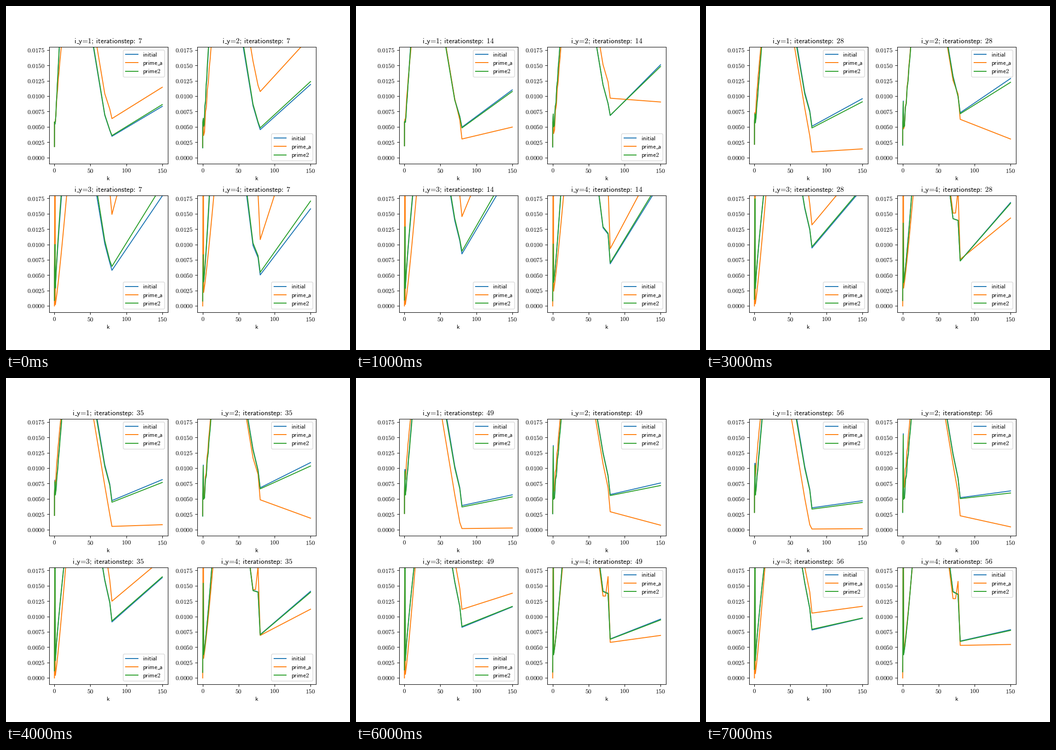
Write a matplotlib script that moves like this. It is 748x748 px and loops after 8 s.

```python
import matplotlib.pyplot as plt
import numpy as np
from matplotlib.animation import FuncAnimation
from matplotlib.lines import Line2D
from matplotlib.patches import FancyBboxPatch

plt.rcParams["mathtext.fontset"] = "cm"

SIZE, DPI = 748, 96
STEPS = 8
LAST = STEPS - 1
TOP = 18                           # upper y limit, in thousandths
COLORS = ["tab:blue", "tab:orange", "tab:green"]

BAR = r"_{\hspace{0.06}\overline{\hspace{0.4}}}"   # short baseline rule
NAMES = ["initial", "prime" + BAR + "a", "prime2"]

fig = plt.figure(figsize=(SIZE / DPI, SIZE / DPI), dpi=DPI, facecolor="white")
grid = fig.subplots(2, 2, gridspec_kw=dict(
    left=93.6 / SIZE, right=673.9 / SIZE, bottom=82.4 / SIZE, top=658.9 / SIZE,
    wspace=0.25, hspace=0.27))
panels = []


def basis(t):
    return np.array([1, np.exp(-t), t])


FIT = np.linalg.inv([basis(t) for t in (0, 2, LAST)])


def value(keys, t):
    """Constant, exponential (first, last) or a quick transient followed by
    exponential drift (first, at step 2, last)."""
    keys = np.atleast_1d(keys)
    if len(keys) == 1:
        return keys[0]
    if len(keys) == 2:
        return keys[0] * (keys[1] / keys[0]) ** (t / LAST)
    return np.exp(basis(t) @ FIT @ np.log(keys))


def curve(t, vertex, end, lift, knee, slope, start, bump, spike, dip, reach,
          power, wobble):
    """Spike and jagged rise near k=0, then a flank falling to a vertex at k=80."""
    vertex, end, lift, knee, start, spike, dip, reach = (
        value(v, t) for v in (vertex, end, lift, knee, start, spike, dip, reach))
    u = np.linspace(0, 1, 9)
    zigzag = wobble * (1 - u) * (-1) ** np.arange(9)
    shoulder = vertex + lift
    k = np.concatenate([[0, 0.1, 0.8], 1.3 + u * (reach - 1.3),
                        [2 * reach, 35, 70, 73.5, 77, 80, 150]])
    y = np.concatenate([[start, bump, spike], dip + (TOP - dip) * u ** power + zigzag,
                        [2 * TOP, shoulder + 35 * slope, shoulder,
                         vertex + lift * min(1, (1 + knee) / 2),
                         vertex + lift * knee, vertex, end]])
    return k, y


def sans(text):
    return r"$\mathsf{" + text + "}$"


def title(number, step):
    return sans("i" + BAR + r"y\text{=}%d\text{;}\hspace{0.45}"
                r"iterationstep\text{:}\hspace{0.45}%d" % (number, step))


def label(x, y, text, align):
    """Text at a pixel position measured from the bottom left."""
    return fig.text(x / SIZE, y / SIZE, text, fontsize=10, ha=align, va="baseline")


def style_axes(ax):
    ax.set_xlim(-7.5, 157.5)
    ax.set_ylim(-1, TOP)
    xs, ys = np.arange(0, 151, 50), np.arange(8) * 2.5
    ax.set_xticks(xs, [r"$\mathrm{%d}$" % v for v in xs])
    ax.set_yticks(ys, [r"$\mathrm{%.4f}$" % (v / 1000) for v in ys])


def make_legend(right, top):
    w, h = 90, 58.8
    left = right - w
    box = FancyBboxPatch((left, top - h), w, h, transform=None,
                         boxstyle="round,pad=0,rounding_size=2.7",
                         fc="white", ec="0.8", lw=1, alpha=0.8)
    parts = [fig.add_artist(box)]
    for n, (name, color) in enumerate(zip(NAMES, COLORS)):
        y = top - 9.3 - 18.3 * n
        line = Line2D([left + 5.3, left + 32], [y, y], transform=None,
                      color=color, lw=1.5)
        parts += [fig.add_artist(line), label(left + 42.2, y - 4.7, sans(name), "left")]
    return parts


def add_panel(raised_from, initial, prime, lag, bump, kink=1, wobble=0):
    number = len(panels) + 1
    ax = grid.flat[number - 1]
    style_axes(ax)
    box = ax.get_position().extents * SIZE
    label((box[0] + box[2]) / 2, box[1] - 36.2, sans("k"), "center")
    lines = [ax.plot([], [], color=c, lw=1.5)[0] for c in COLORS]
    upper = make_legend(box[2] - 6.6, box[3] - 6.7)
    lower = make_legend(box[2] - 6.6, box[1] + 65.4)

    common = dict(bump=bump, slope=0.5 + 0.2 * kink, wobble=wobble)
    initial = dict(lift=np.array([4.1, 5.8, 7.4]) + 0.45 * (number - 2.5),
                   knee=np.array([0.28, 0.44, 0.45]) * kink, **initial, **common)
    prime = dict(prime, **common)

    def update(t):
        k, y = curve(t, **initial)
        drift = value((1.035, 0.955, 0.94), t)
        at_vertex, at_end = drift + lag[0], drift + lag[1]
        gain = np.where(k < 80, np.sqrt(at_vertex), np.where(k < 150, at_vertex, at_end))
        gain[:2] = 1
        lines[0].set_data(k, y)
        lines[1].set_data(*curve(t, **prime))
        lines[2].set_data(k, y * gain)
        ax.set_title(title(number, 7 * (t + 1)), fontsize=11.75)
        for part in upper:
            part.set_visible(t >= raised_from)
        for part in lower:
            part.set_visible(t < raised_from)

    panels.append(update)


def reach(offset):
    return np.array([6.8, 9.3, 10.4]) + offset


def shrink(first):
    return first, 0.86 * first


add_panel(
    0, lag=(0, 0), bump=5.8, wobble=0.3,
    initial=dict(vertex=(3.47, 5.3, 3.55), end=(8.34, 10.85, 4.7),
                 start=(1.8, 2.8), spike=(5.45, 10.8), dip=5.5,
                 reach=reach(0), power=1),
    prime=dict(vertex=(6.35, 1.63, 0.1), end=(11.45, 2.57, 0.15),
               lift=(4.05, 7.3, 5), knee=(0.38, 0.44, 0.14),
               start=(1.8, 2.8), spike=(5.8, 10), dip=(5.5, 8.3),
               reach=shrink(9.5), power=0.8))

add_panel(
    3, lag=(0.03, 0.005), bump=5.8, wobble=0.8,
    initial=dict(vertex=(4.55, 7.5, 5.2), end=(11.9, 14.65, 6.3),
                 start=(1.6, 2.8), spike=(6.2, 15.6), dip=4.2,
                 reach=reach(1.4), power=1),
    prime=dict(vertex=(10.75, 7.9, 2.25), end=(19.7, 5.05, 0.45),
               lift=(4.95, 5.9, 8.35), knee=(0.2, 0.63, 0.45),
               start=(1.8, 3), spike=(5.8, 9), dip=(2.8, 6),
               reach=shrink(11.7), power=0.95))

add_panel(
    7, lag=(0.075, 0.065), bump=5.8,
    initial=dict(vertex=(5.8, 9.4, 7.8), end=(17.9, 21.6, 9.7),
                 start=(0.9, 1.4), spike=(9.5, 15, 28), dip=2.8,
                 reach=reach(3.1), power=0.85),
    prime=dict(vertex=(14.9, 13.9, 10.55), end=(45.9, 27.7, 11.65),
               lift=(12, 10, 7.45), knee=(0.31, 0.34, 0.46),
               start=0, spike=40, dip=(0.2, 0.7),
               reach=shrink(17), power=1.15))

add_panel(
    5, lag=(0.05, 0.045), bump=2.9, kink=2.1,
    initial=dict(vertex=(5.05, 7.4, 6), end=(15.8, 19.35, 7.85),
                 start=(0.8, 1), spike=(8, 11.7, 23), dip=3.8,
                 reach=reach(2.7), power=1.2),
    prime=dict(vertex=(10.8, 8.35, 5.3), end=(36.2, 18.5, 5.45),
               lift=(13, 7.85, 7.6), knee=(0.57, 1.42, 1.37),
               start=0, spike=40, dip=(2.2, 4.2),
               reach=shrink(15.5), power=1.15))


def draw(t):
    for update in panels:
        update(t)
    return []


anim = FuncAnimation(fig, draw, frames=STEPS, interval=1000, repeat=True,
                     repeat_delay=0, init_func=lambda: draw(0), blit=False)
plt.show()
```
